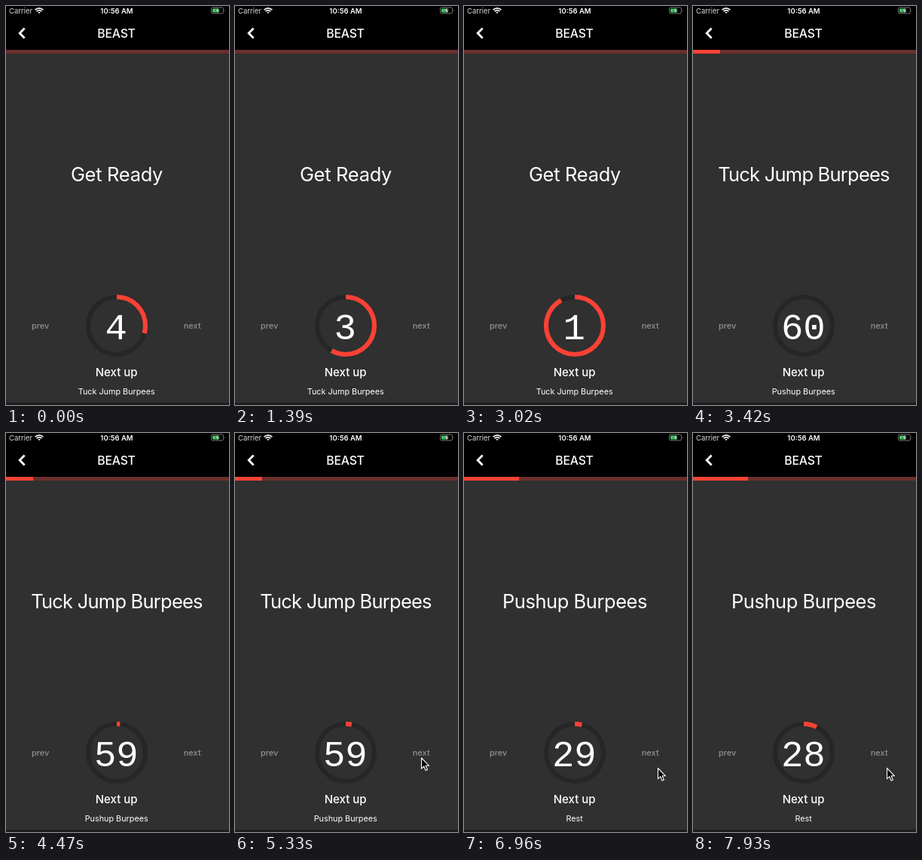
These frames come from a looping animation (296 by 528 pixels, 7.99 s). An HTML page:

```html
<!DOCTYPE html>
<html lang="en">
<head>
<meta charset="utf-8">
<title>Workout timer</title>
<style>
  html, body { margin: 0; width: 100%; height: 100%; overflow: hidden; background: #000; }
  svg { display: block; width: 296px; height: 528px; }
  text { font-family: Inter, Roboto, sans-serif; font-optical-sizing: none; fill: #fff; text-anchor: middle; }
  .status { font-size: 9.5px; }
  .title { font-size: 15.8px; font-weight: 500; letter-spacing: -.2px; }
  .button { font-size: 11px; font-weight: 500; fill: #919191; }
  #exercise { font-size: 25.5px; }
  #count { font: 49px "Liberation Mono", monospace; }
  .next { font-size: 15px; font-weight: 500; }
  #upcoming { font-size: 10.8px; }
</style>
</head>
<body>
<svg viewBox="0 0 296 528">
  <rect width="296" height="528" fill="#000"/>
  <rect y="58" width="296" height="467" fill="#303030"/>
  <rect y="525" width="296" height="3" fill="#1d1d1f"/>

  <text class="status" x="4" y="9.5" style="text-anchor:start" fill-opacity=".85">Carrier</text>
  <g fill="none" stroke="#fff" stroke-width="1.7">
    <path d="M38.6 5.2Q44 .4 49.4 5.2M40.6 7.2Q44 4.2 47.4 7.2"/>
    <path d="M42.3 8.3Q44 7 45.7 8.3L44 10Z" fill="#fff" stroke="none"/>
  </g>
  <text class="status" x="147" y="9.5" font-weight="600">10:56 AM</text>
  <rect x="272.5" y="1.9" width="16" height="8" rx="2" fill="none" stroke="#777"/>
  <rect x="274" y="3.4" width="9" height="5" rx=".8" fill="#36d15c"/>
  <path d="M290 4.4q1.5 1.5 0 3z" fill="#777"/>
  <path d="M282 1.6 277.5 6.4H280.2L279 10.4 283.6 5.4H280.9Z" fill="#fff" stroke="#000" stroke-width=".5"/>

  <path d="M24.6 29.6 18.2 36 24.6 42.4" fill="none" stroke="#fff" stroke-width="2.8"/>
  <text class="title" x="146.5" y="41.7">BEAST</text>

  <rect y="58" width="296" height="5" fill="#692f2d"/>
  <rect id="progress" y="58" height="5" fill="#fa4235"/>

  <text id="exercise" x="147" y="232"></text>
  <text class="button" x="45.7" y="426.5">prev</text>
  <text class="button" x="247.2" y="426.5">next</text>

  <g fill="none" stroke-width="6.2" transform="rotate(-90 147 423)">
    <circle cx="147" cy="423" r="38" stroke="#262626"/>
    <circle id="arc" cx="147" cy="423" r="38" stroke="#fa4235" pathLength="1"/>
  </g>
  <text id="count" x="146.3" y="441"></text>
  <text class="next" x="146.7" y="490">Next up</text>
  <text id="upcoming" x="146.7" y="513.7"></text>

  <path id="cursor" d="M0 0V14.2L3.3 11.2 5.6 16.5 7.9 15.5 5.6 10.3H10Z"
        fill="#000" stroke="#fff" stroke-width="1.1" stroke-linejoin="round"/>
</svg>
<script>
const LOOP = 7990;
const RATE = 1.04 / 1000; // timer seconds per millisecond

const screens = [
  { start: -1409, seconds: 5, name: 'Get Ready', tracking: -.3, upcoming: 'Tuck Jump Burpees', progress: 0 },
  { start: 3410, seconds: 60, name: 'Tuck Jump Burpees', tracking: -.77, upcoming: 'Pushup Burpees', progress: 36 },
  { start: 5805, seconds: 30, name: 'Pushup Burpees', tracking: -.45, upcoming: 'Rest', progress: 73 },
];

// [time, x, y] of the pointer tip
const pointer = [
  [5150, 249, 431], [5330, 247.5, 430], [5680, 249.5, 431.5],
  [6210, 248.5, 432], [6500, 251, 434], [6800, 257.5, 443.5],
];

const [progress, exercise, arc, count, upcoming, cursor] =
  ['progress', 'exercise', 'arc', 'count', 'upcoming', 'cursor'].map(id => document.getElementById(id));

const smooth = k => k * k * (3 - 2 * k);

function pointerAt(t) {
  const i = pointer.findIndex(p => p[0] > t);
  if (i < 0) return pointer[pointer.length - 1].slice(1);
  const [t0, x0, y0] = pointer[i - 1], [t1, x1, y1] = pointer[i];
  const k = smooth((t - t0) / (t1 - t0));
  return [x0 + (x1 - x0) * k, y0 + (y1 - y0) * k];
}

function draw(t) {
  const screen = screens.filter(s => s.start <= t).pop();
  const elapsed = Math.min((t - screen.start) * RATE, screen.seconds);

  exercise.textContent = screen.name;
  exercise.style.letterSpacing = screen.tracking + 'px';
  upcoming.textContent = screen.upcoming;
  progress.setAttribute('width', screen.progress);
  count.textContent = Math.max(1, Math.ceil(screen.seconds - elapsed));
  arc.setAttribute('stroke-dasharray', `${elapsed / screen.seconds} 2`);

  const visible = t >= pointer[0][0];
  cursor.style.display = visible ? '' : 'none';
  if (visible) cursor.setAttribute('transform', `translate(${pointerAt(t)})`);
}

function tick() {
  draw(performance.now() % LOOP);
  requestAnimationFrame(tick);
}
tick();
</script>
</body>
</html>
```
